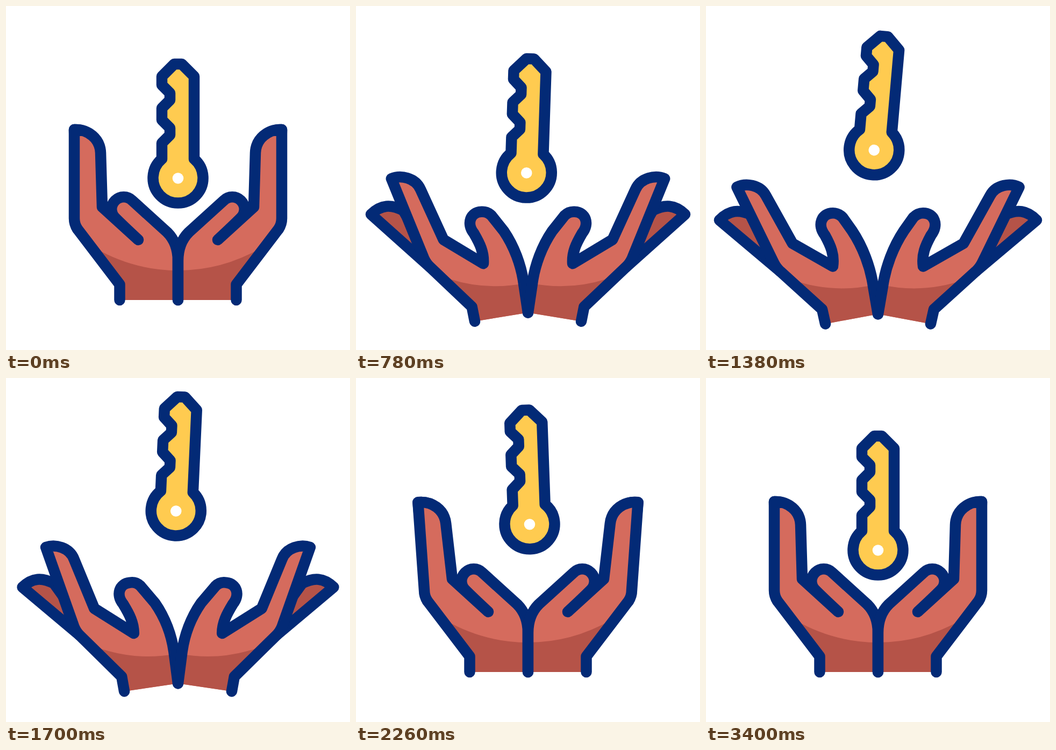
Write an HTML page that moves like this. It is 640 px wide and 640 px high and loops after 3500 ms.

```html
<!DOCTYPE html>
<html lang="en">
<head>
<meta charset="utf-8">
<title>Key above two hands</title>
<style>
  html, body { margin: 0; width: 100%; height: 100%; overflow: hidden; background: #fff; }
  svg { display: block; width: 100vw; height: 100vh; }
  .line { fill: none; stroke: #032a76; stroke-width: 20.5; stroke-linecap: round; stroke-linejoin: round; }
  .skin { fill: #d56b5d; }
  .shade { fill: #b55348; }
</style>
</head>
<body>
<svg viewBox="0 0 640 640">
  <defs>
    <g id="hand">
      <path id="back" class="line" style="fill:#b55348"/>
      <path id="palm" class="skin"/>
      <path id="shadow" class="shade"/>
      <path id="outline" class="line"/>
    </g>
  </defs>
  <use href="#hand"/>
  <use href="#hand" transform="translate(640) scale(-1 1)"/>
  <g id="key">
    <path class="line" style="fill:#ffcb50" d="M313 108H327L350 131V284.5A46.5 46.5 0 1 1 290 284.5V255L305 240V227L290 212V190L305 175V162L290 147V131Z"/>
    <circle cx="320" cy="320.5" r="10.3" fill="#fff"/>
  </g>
</svg>
<script>
const LOOP = 3500;
const $ = id => document.getElementById(id);

// Each part: [closed pose, open pose], same commands in both
const parts = {
  wrist: ['M211.5 547L211.5 518L133 415Q127 406 127 395',
          'M222 591L216 564L138 493Q131 487 126 477'],
  tip: ['L127 230C153 229 175 247 176 273',
        'L58 336C74 328 101 331 112 352'],
  thumb: ['L179 374L246 435C232 422 217 408 203 394C194 385 194 371 203 362C212 353 226 353 235 362L300 421C313 434 320 452 320 474L320 547',
          'L161 441L236 484C239 462 232 446 221 426C206 407 215 385 236 385C244 385 249 388 254 393L272 418C292 448 306 485 311 520L320 573'],
  shadow: ['M165 450Q238 492 320 492L320 547L211.5 547L211.5 518Z',
           'M158 508Q235 536 316 518L320 573L222 591L216 564Z'],
  backRoot: ['M133 415', 'M138 493'],
  backTip: ['L127 230C153 229 170 247 171 273', 'L24 400C42 381 60 379 84 390'],
  backEnd: ['L174 374', 'L125 460']
};

// Keys: [time, value, linear?]
const tracks = {
  palm: [[120, 0], [640, .88], [1560, 1.04, true], [2020, 0]],
  back: [[120, 0], [640, .925], [1600, 1.01, true], [2180, 0]],
  bend: [[120, 0], [640, 1.3], [1380, 0], [1600, 0], [1960, 7.7], [2460, -10], [2800, 0]],
  reach: [[120, 1], [640, 1.025], [1380, 1]],
  lift: [[640, 0], [1680, -73, true], [2230, -48], [2480, -55], [2840, -33], [2980, -41], [3390, 0]],
  sway: [[360, 0], [1360, 5], [2220, -2.1], [2820, 3], [3400, 0]]
};

function at(keys, t) {
  const i = keys.findIndex(k => k[0] > t);
  if (i < 0) return keys[keys.length - 1][1];
  if (i === 0) return keys[0][1];
  const [t0, v0] = keys[i - 1], [t1, v1, linear] = keys[i];
  const f = (t - t0) / (t1 - t0);
  return v0 + (v1 - v0) * (linear ? f : (1 - Math.cos(Math.PI * f)) / 2);
}

const number = /-?\d+(\.\d+)?/g;

function morph([a, b], f) {
  const end = b.match(number);
  let i = 0;
  return a.replace(number, n => (+n + (end[i++] - n) * f).toFixed(2));
}

// Turn and stretch every point of a path about the knuckle
function turn(d, degrees, reach, f) {
  const r = degrees * Math.PI / 180, c = reach * Math.cos(r), s = reach * Math.sin(r);
  const kx = 140, ky = 400 + 70 * f;
  return d.replace(/(-?[\d.]+) (-?[\d.]+)/g, (_, px, py) => {
    const x = px - kx, y = py - ky;
    return (kx + x * c - y * s).toFixed(2) + ' ' + (ky + x * s + y * c).toFixed(2);
  });
}

function draw(now) {
  const t = now % LOOP;
  const p = at(tracks.palm, t), q = at(tracks.back, t);
  const bend = at(tracks.bend, t), reach = at(tracks.reach, t);
  const hand = morph(parts.wrist, p) + turn(morph(parts.tip, p), bend, reach, p) + morph(parts.thumb, p);

  $('palm').setAttribute('d', hand + 'Z');
  $('outline').setAttribute('d', hand);
  $('shadow').setAttribute('d', morph(parts.shadow, p));
  $('back').setAttribute('d', morph(parts.backRoot, p) +
    turn(morph(parts.backTip, q), Math.min(bend, 0), reach, q) + morph(parts.backEnd, p));
  $('key').setAttribute('transform',
    `translate(0 ${at(tracks.lift, t).toFixed(2)}) rotate(${at(tracks.sway, t).toFixed(3)} 320 237)`);
}

const start = performance.now();
function tick() {
  draw(performance.now() - start);
  requestAnimationFrame(tick);
}
tick();
</script>
</body>
</html>
```
